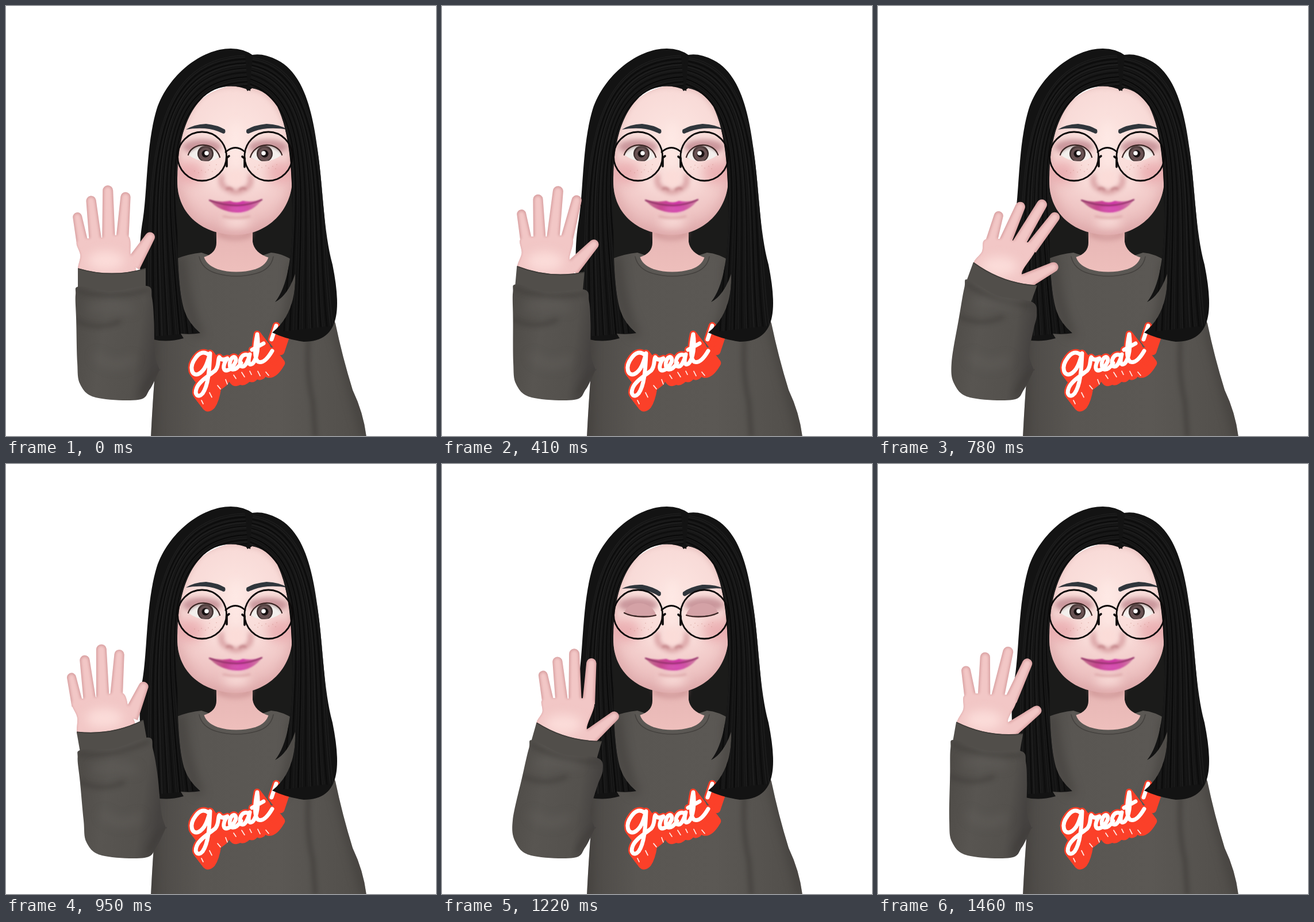
An HTML page that plays this animation: 748x748 px, repeating every 1.56 s.

```html
<!DOCTYPE html>
<html lang="en">
<head>
<meta charset="utf-8">
<title>Waving avatar</title>
<style>
html, body { margin: 0; width: 100%; height: 100%; overflow: hidden; background: #fff; }
svg { display: block; width: 100vw; height: 100vh; }
.line { fill: none; stroke-linecap: round; stroke-linejoin: round; }
.b1 { filter: blur(1px); }
.b2 { filter: blur(2px); }
.b4 { filter: blur(4px); }
.b9 { filter: blur(9px); }
</style>
</head>
<body>
<svg viewBox="0 0 748 748">
  <defs>
    <radialGradient id="skin" gradientUnits="userSpaceOnUse" cx="400" cy="230" r="172">
      <stop offset="0" stop-color="#fde6e2"/><stop offset=".5" stop-color="#f8dad7"/>
      <stop offset=".75" stop-color="#f0c7c6"/><stop offset="1" stop-color="#e3b0b1"/>
    </radialGradient>
    <linearGradient id="neck" x2="0" y2="1">
      <stop offset="0" stop-color="#d8a2a1"/><stop offset=".4" stop-color="#e8b8b6"/><stop offset="1" stop-color="#eebfbc"/>
    </linearGradient>
    <linearGradient id="cloth" x2="1" y2="0">
      <stop offset="0" stop-color="#4b4845"/><stop offset=".25" stop-color="#595652"/>
      <stop offset=".6" stop-color="#5b5854"/><stop offset="1" stop-color="#514e4a"/>
    </linearGradient>
    <linearGradient id="sleeveFill" x2="1" y2=".2">
      <stop offset="0" stop-color="#4d4a46"/><stop offset=".4" stop-color="#585551"/>
      <stop offset=".8" stop-color="#54514d"/><stop offset="1" stop-color="#454240"/>
    </linearGradient>
    <linearGradient id="lip" x2="1" y2="0">
      <stop offset="0" stop-color="#c0778c"/><stop offset=".3" stop-color="#c5478f"/>
      <stop offset=".6" stop-color="#cf35a6"/><stop offset="1" stop-color="#cf86a0"/>
    </linearGradient>
    <clipPath id="faceClip"><use href="#face"/></clipPath>
    <clipPath id="bodyClip"><use href="#body"/></clipPath>
    <clipPath id="hairClip"><use href="#leftHair"/><use href="#rightHair"/></clipPath>
    <clipPath id="eyeClip"><path id="eyeShape"/></clipPath>
    <clipPath id="handClip"><path id="handShape"/></clipPath>
    <clipPath id="sleeveClip"><path id="sleeveShape"/></clipPath>

    <path id="word" class="line" d="M353 607Q341 597 330 612C317 629 324 645 335 640C347 634 351 618 355 604C354 632 352 660 342 674C334 683 327 676 332 664C337 652 353 643 364 634C371 626 368 616 371 611Q375 618 385 613C379 621 375 634 384 634C393 632 404 617 398 611C391 608 385 627 393 632C399 634 405 627 409 621M422 608C411 601 402 620 410 627C417 629 422 614 424 606C421 618 421 627 429 622C437 614 440 590 437 571C433 590 431 614 439 619C448 622 456 612 463 600M428 598L448 587M470 556L462 580"/>

    <g id="eye">
      <ellipse class="b4" cx="341" cy="245" rx="34" ry="13" fill="#bf878e" opacity=".8"/>
      <path d="M317 259C324 236 364 235 373 264Q345 273 317 259" fill="#d4a2a6"/>
      <g clip-path="url(#eyeClip)">
        <path d="M310 230h70v50h-70z" fill="#f3efec"/>
        <circle cx="347" cy="257" r="14" fill="#3d2f2e"/>
        <circle cx="347" cy="258" r="11.5" fill="#685253"/>
        <circle cx="347" cy="257" r="6.500" fill="#171112"/>
        <circle cx="349" cy="256" r="3.800" fill="#fff"/>
        <path class="line b2" d="M314 256Q345 228 376 258" stroke="#8d7172" stroke-width="5" opacity=".6"/>
      </g>
      <path id="lash" class="line" stroke="#3a2523" stroke-width="2.200"/>
    </g>
    <path id="brow" d="M313 215Q326 206 348 205Q368 207 381 215Q383 222 378 222Q362 214 346 213Q328 212 313 215Z" fill="#30363c"/>
    <path id="leftHair" d="M425 148C400 134 362 136 338 164C312 192 298 240 298 300C298 380 296 490 311 532Q318 552 338 569Q322 572 304 570L309 578Q280 586 256 580Q246 572 240 530C234 480 228 430 238 372C246 320 244 240 262 180C282 120 340 74 391 74Q414 74 430 86Z"/>
    <path id="rightHair" d="M424 86Q445 80 472 94C520 118 534 190 542 250C552 320 552 390 568 450Q580 510 574 540Q566 584 518 584Q488 580 463 568Q505 535 503 466Q490 504 468 515C492 485 498 430 498 360C498 290 494 220 472 175Q452 146 428 143L420 148L414 138Z"/>
  </defs>

  <path d="M290 250H505V450H290z" fill="#1b1b1a"/>

  <path id="body" d="M252 750Q255 690 259 640L245 600V470Q290 434 340 429Q400 452 461 429Q500 432 540 480L573 552Q585 610 603 668Q622 708 627 750z" fill="url(#cloth)"/>
  <g clip-path="url(#bodyClip)">
    <path class="line b9" d="M255 560L252 748M626 748L575 560" stroke="#3f3c39" stroke-width="10"/>
    <path class="line b9" d="M303 440Q310 520 336 570M499 450Q502 540 472 575" stroke="#403d3a" stroke-width="10"/>
    <path class="line b4" d="M526 580Q522 640 534 690L538 748" stroke="#3e3b38" stroke-width="5"/>
  </g>

  <path d="M366 370V412Q366 430 344 437Q348 456 372 462Q400 467 430 462Q454 456 458 438Q432 430 429 410V370z" fill="url(#neck)"/>
  <path class="b4" d="M368 385Q400 412 428 385L427 402Q400 414 369 402z" fill="#c98f90" opacity=".6"/>
  <path class="line" d="M340 434Q344 453 367 461Q400 471 435 461Q457 454 461 434" stroke="#5b5854" stroke-width="7"/>
  <path class="line" d="M336 436Q341 458 366 465Q400 475 436 465Q461 458 465 436" stroke="#45423f" stroke-width="1.500"/>

  <g id="print"></g>
  <path id="ticks" class="line" stroke="#ffe9e4" stroke-width="1.700"/>
  <use href="#word" stroke="#fff" stroke-width="7"/>

  <path id="face" d="M420 136C360 136 300 170 298 260V305C298 365 345 398 400 398C455 398 498 355 498 300V250C494 180 470 136 420 136Z" fill="url(#skin)"/>
  <g clip-path="url(#faceClip)">
    <path class="line b9" d="M290 250Q288 330 330 382Q400 416 470 376Q510 330 504 250" stroke="#d79d9f" stroke-width="11" opacity=".7"/>
    <path class="line b4" d="M298 270Q301 200 340 155Q380 130 421 142Q460 142 485 200Q496 230 499 290" stroke="#d8a9a7" stroke-width="6" opacity=".6"/>
    <g class="b9" fill="#e4999f" opacity=".6">
      <ellipse cx="320" cy="290" rx="25" ry="20"/><ellipse cx="478" cy="290" rx="25" ry="20"/>
    </g>
    <ellipse class="b9" cx="401" cy="376" rx="24" ry="9" fill="#fbe0dc"/>
    <ellipse class="b9" cx="400" cy="245" rx="9" ry="45" fill="#ffebe7" opacity=".8"/>
  </g>
  <g id="freckles" fill="#c88c83" opacity=".6"></g>

  <path class="line b4" d="M375 296Q371 314 387 319Q400 328 414 319Q429 314 425 296" stroke="#c98489" stroke-width="7" opacity=".8"/>
  <ellipse class="b4" cx="400" cy="300" rx="14" ry="14" fill="#fbdcd8"/>
  <path class="line b2" d="M384 318Q391 315 394 320M406 320Q410 315 417 318" stroke="#b56f75" stroke-width="2.500"/>

  <path class="b1" d="M353 337Q372 342 390 339Q401 344 412 339Q430 342 446 336Q430 359 402 359Q370 358 353 337Z" fill="url(#lip)"/>
  <ellipse class="b4" cx="403" cy="353" rx="18" ry="3" fill="#dc6dbd"/>
  <path class="line b1" d="M354 338Q378 347 402 347Q426 346 445 337" stroke="#8e2f66" stroke-width="2.200"/>
  <path class="line b2" d="M378 366Q401 371 424 366" stroke="#d9a2a4" stroke-width="3"/>

  <use href="#eye"/>
  <use href="#eye" transform="matrix(-1 0 0 1 797 0)"/>
  <g class="browTurn"><use href="#brow"/></g>
  <g transform="matrix(-1.05 0 0 1 818.600 0)"><g class="browTurn"><use href="#brow"/></g></g>

  <g fill="#131313"><use href="#leftHair"/><use href="#rightHair"/></g>
  <g clip-path="url(#hairClip)"><g id="strands" class="line"></g></g>

  <g class="line" stroke="#0c0a0a" stroke-width="2.800">
    <circle cx="341" cy="261.500" r="42.500"/><ellipse cx="456.500" cy="261.500" rx="41.500" ry="42.500"/>
    <path d="M382 254Q399 239 416 254"/>
    <path d="M388 261L384 264V279M411 262L415 265V280" stroke-width="3.600"/>
  </g>

  <path id="handEdge" fill="#d9a1a2"/>
  <g clip-path="url(#handClip)">
    <path id="handLight" class="b2" fill="#f2c7c6"/>
    <ellipse id="palmGlow" class="b9" rx="32" ry="17" fill="#fbdcd9"/>
  </g>
  <path id="cuff" fill="#514e4a" stroke="#514e4a" stroke-width="2" stroke-linejoin="round"/>
  <path id="cuffRim" class="line" stroke="#3d3a37" stroke-width="1.500"/>
  <path id="sleeve" fill="url(#sleeveFill)"/>
  <g clip-path="url(#sleeveClip)">
    <path id="folds" class="line b4" stroke="#3f3c39" stroke-width="6" opacity=".7"/>
    <path id="lights" class="line b9" stroke="#65625e" stroke-width="12" opacity=".6"/>
  </g>
</svg>
<script>
const $ = id => document.getElementById(id);
const set = (id, attrs) => { for (const k in attrs) $(id).setAttribute(k, attrs[k]); };
const mix = (a, b, k) => a + (b - a) * k;
const mixAll = (p, q, k) => p.map((v, i) => mix(v, q[i], k));
const add = (p, x, y) => [p[0] + x, p[1] + y];
const fmt = p => p.map(v => v.toFixed(1)).join(' ');

// Point at a distance from p; angle in degrees, clockwise from straight up
function polar(p, angle, r) {
  const a = angle * Math.PI / 180;
  return add(p, r * Math.sin(a), -r * Math.cos(a));
}

// Closed Catmull-Rom curve; a doubled point makes a corner
function blob(pts) {
  const n = pts.length;
  return 'M' + fmt(pts[0]) + pts.map((b, i) => {
    const a = pts[(i + n - 1) % n], c = pts[(i + 1) % n], d = pts[(i + 2) % n];
    return 'C' + fmt([b[0] + (c[0] - a[0]) / 6, b[1] + (c[1] - a[1]) / 6,
      c[0] - (d[0] - b[0]) / 6, c[1] - (d[1] - b[1]) / 6, ...c]);
  }).join('') + 'Z';
}

function put(parent, tag, attrs) {
  const el = document.createElementNS('http://www.w3.org/2000/svg', tag);
  for (const k in attrs) el.setAttribute(k, attrs[k]);
  $(parent).append(el);
}

// Hair strands blend from an outer to an inner Bezier curve
function strands(outer, inner, count = 22) {
  for (let i = 1; i < count; i++) {
    const [x, y, ...rest] = mixAll(outer, inner, (i + .3 * Math.sin(i * 5)) / count);
    put('strands', 'path', {
      d: `M${fmt([x, y])}C${fmt(rest)}`, stroke: i % 3 ? '#202020' : '#090909',
      'stroke-width': 1 + i % 4 * .4, opacity: .5 + .4 * Math.abs(Math.sin(i * 2))
    });
  }
}
strands([415, 84, 240, 90, 245, 300, 245, 575], [420, 142, 255, 150, 300, 350, 330, 568]);
strands([430, 88, 575, 110, 545, 380, 572, 555], [424, 146, 520, 190, 495, 330, 478, 566]);

for (let i = 0; i <= 14; i++)
  put('print', 'use', { href: '#word', x: i * 1.15, y: i * 1.5, stroke: '#fb4029', 'stroke-width': 12.5 });

let ticks = '';
for (let i = 0; i < 9; i++) ticks += `M${340 + i * 14} ${686 - i * 6 - 20 * Math.sin(i / 2.6)}l${3 + i % 3} ${6 + i % 2 * 2}`;
set('ticks', { d: ticks });

for (let i = 0; i < 18; i++) {
  const x = 327 + i * 37 % 43;
  put('freckles', 'circle', { cx: i % 2 ? x : 798 - x, cy: 276 + i * 23 % 15, r: .8 });
}

// One wave, right to left and back: wrist x, cuff tilt, hand lean, finger lean, finger spread, elbow x
const wave = [
  [221, 16, -1, -4, 17, 123],
  [221, 20, 10, 30, 23, 128],
  [194, 10, 2, 8, 38, 124],
  [184, 0, -16, -4, 18, 124],
  [181, -10, -23, -5, 19, 135],
  [174, 2, -9, -11, 16, 111]
];
// Time in ms and place in the wave, counted on through the loop
const beats = [[0, 3], [240, 6], [580, 11], [780, 13], [950, 16], [1220, 18], [1460, 20], [1560, 21]];

function poseAt(t) {
  const i = beats.findIndex(b => b[0] > t);
  const [t0, p0] = beats[i - 1], [t1, p1] = beats[i];
  const place = mix(p0, p1, (t - t0) / (t1 - t0)), n = Math.floor(place);
  return mixAll(wave[n % 6], wave[(n + 1) % 6], place - n);
}

// Tapered finger with a round tip
function finger(base, tip, w0, w1) {
  const a = Math.atan2(tip[1] - base[1], tip[0] - base[0]);
  const nx = -Math.sin(a) / 2, ny = Math.cos(a) / 2;
  return `M${fmt(add(base, nx * w0, ny * w0))}L${fmt(add(tip, nx * w1, ny * w1))}` +
    `A${w1 / 2} ${w1 / 2} 0 0 0 ${fmt(add(tip, -nx * w1, -ny * w1))}L${fmt(add(base, -nx * w0, -ny * w0))}Z`;
}

function drawArm([x, tilt, lean, bend, spread, elbow]) {
  const wrist = [x, 454.5 + (x - 174) * .26];
  const left = polar(wrist, tilt - 90, 58), right = polar(wrist, tilt + 90, 58);
  const down = (p, h) => polar(p, tilt + 180, h);

  const knuckles = polar(wrist, lean, 58);
  const bases = [0, 1, 2, 3].map(k =>
    polar(polar(knuckles, 91 + lean * .7, (k / 3 - .5) * 70), lean, 4 * Math.sin(k * Math.PI / 3)));
  const tips = [42, 62, 75, 63].map((len, k) => polar(bases[k], bend + spread * (k / 3 - .5), len));
  const thumb = add(right, -16, -12), thumbTip = polar(thumb, 52 + lean * 1.4, 50);
  const [little, , , index] = bases;

  const palm = blob([add(index, 9, 4), add(bases[1], 10, 3), add(little, -9, 1),
    mixAll(add(little, -7, 0), add(left, 6, 2), .5), down(add(left, 6, 0), 12),
    down(add(right, -24, 0), 16), add(thumb, -2, 4), add(thumb, -9, -12)]);
  const fingers = thin => tips.map((tip, k) => {
    const w = Math.hypot(tip[0] - bases[k][0], tip[1] - bases[k][1]) * .06 - thin;
    return finger(add(bases[k], 0, 8), tip, 18 + w, 13.5 + w);
  }).join('') + finger(add(thumb, -6, 6), thumbTip, 28 - thin, 17 - thin);
  const hand = fingers(0) + palm;
  set('handEdge', { d: hand });
  set('handShape', { d: hand });
  set('handLight', { d: fingers(5) + palm });
  set('palmGlow', { cx: wrist[0] - 10, cy: wrist[1] - 14 });

  const cuffLeft = down(left, 33), cuffRight = down(right, 33);
  const rim = `M${fmt(left)}Q${fmt(down(wrist, 17))} ${fmt(right)}`;
  set('cuff', { d: `${rim}L${fmt(cuffRight)}Q${fmt(down(wrist, 48))} ${fmt(cuffLeft)}Z` });
  set('cuffRim', { d: rim });

  const outer = add(cuffLeft, -5, 12), inner = add(cuffRight, 12, 18), fold = mixAll(outer, [elbow, 615], .4);
  const crease = [elbow + 143, 633];
  const sleeve = blob([add(cuffLeft, 2, -2), outer, fold, [elbow, 620], [elbow + 5, 658], [elbow + 32, 681],
    [elbow + 106, 685], [elbow + 126, 667], crease, crease, [elbow + 135, 605],
    mixAll([elbow + 137, 590], inner, .5), inner, add(cuffRight, 3, -3), down(wrist, 39)]);
  set('sleeve', { d: sleeve });
  set('sleeveShape', { d: sleeve });
  set('folds', { d: `M${fmt(add(cuffLeft, 0, 6))}Q${fmt(down(wrist, 54))} ${fmt(add(cuffRight, 4, 4))}` +
    `M${fmt(fold)}q35 18 75 2M${fmt(crease)}q-22 18 -30 40` });
  set('lights', { d: `M${fmt(add(fold, 25, -22))}q40 -6 70 2M${elbow + 35} 610q30 25 60 5` });
}

function drawEyes(shut) {
  const lid = `M317 259C${fmt([mix(324, 332, shut), mix(236, 267, shut), mix(364, 358, shut), mix(235, 267, shut)])} 372 263`;
  set('lash', { d: lid });
  set('eyeShape', { d: `${lid}Q345 ${mix(279, 268, shut)} 317 259Z` });
  document.querySelectorAll('.browTurn').forEach(el =>
    el.setAttribute('transform', `translate(0 ${2 * shut}) rotate(${5 * shut} 313 213)`));
}

// Held pictures alternate short and long, with one extra long hold
const LOOP = 1560;
const hold = i => i % 2 || i === 8 ? 100 : 70;
const blink = t => Math.max(0, Math.min(1, 1.1 - Math.abs(t - 1220) / 130));

let shown = -1;
const start = performance.now();
function frame(now) {
  const t = Math.max(0, now - start) % LOOP;
  let at = 0;
  for (let i = 0; at + hold(i) <= t; i++) at += hold(i);
  if (at !== shown) {
    shown = at;
    drawArm(poseAt(at));
    drawEyes(blink(at));
  }
  requestAnimationFrame(frame);
}
frame(start);
</script>
</body>
</html>
```
